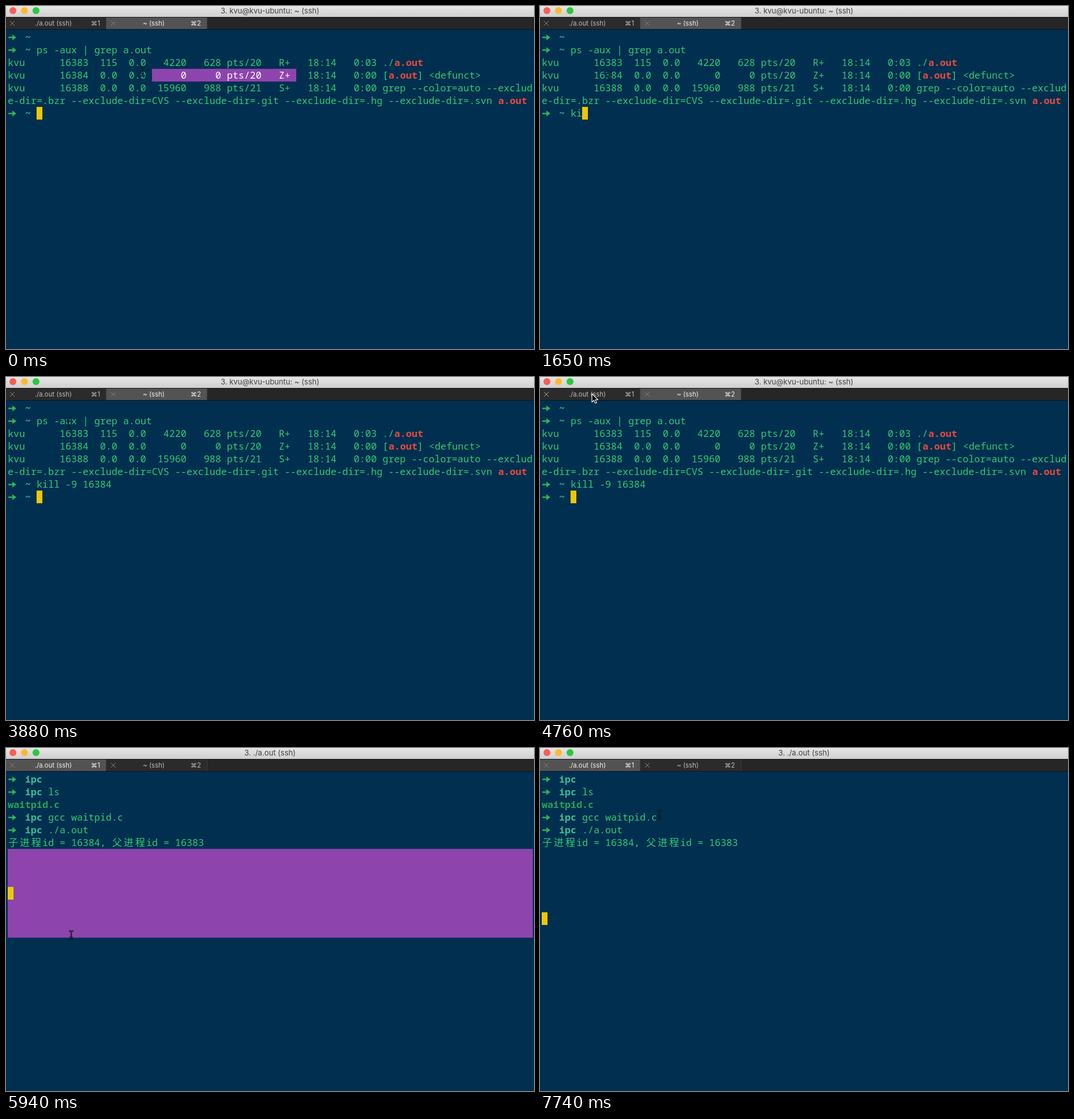
An HTML page that plays this animation: 915 px wide and 595 px high, repeating every 8 s.

```html
<!DOCTYPE html>
<html lang="en">
<head>
<meta charset="utf-8">
<title>Terminal session</title>
<style>
  html, body { margin: 0; width: 100%; height: 100%; overflow: hidden; background: #002f50; }
  svg { display: block; width: 915px; height: 595px; }
  text { white-space: pre; font: 16.667px "Noto Sans Mono", "DejaVu Sans Mono", monospace; fill: #2ecc71; }
  .bold { font-weight: 600; }
  .red { fill: #e74c3c; }
  .dir { fill: #36c096; }
  .file { fill: #27a354; }
  .cjk { font: 17px "Noto Sans CJK SC", "Noto Sans CJK", sans-serif; }
  .prompt { fill: #2faf5b; }
  .lit text { fill: #fff; }
  .lit .prompt { fill: #fff; }
  .ui { font: 11.3px Inter, "DejaVu Sans", sans-serif; fill: #bcbcbc; }
  #title { font-size: 13px; fill: #404040; text-anchor: middle; }
  .tab rect { fill: #2b2b2b; }
  .tab path { stroke: #848484; stroke-width: 1; fill: none; }
  .tab.on rect { fill: #535353; }
  .tab.on path { stroke: #7d7d7d; }
  .tab.on .ui { fill: #f2f2f2; }
  .tab.hover path { stroke: #a8a8a8; }
  .mid { text-anchor: middle; }
  .end { text-anchor: end; }
</style>
</head>
<body>
<svg id="stage" viewBox="0 0 915 595">
  <defs>
    <linearGradient id="bar" x1="0" y1="0" x2="0" y2="1">
      <stop offset="0" stop-color="#e6e6e6"/>
      <stop offset="1" stop-color="#cfcfcf"/>
    </linearGradient>
    <clipPath id="selClip"></clipPath>
  </defs>
  <rect width="915" height="595" fill="#002f50"/>
  <rect width="915" height="19" fill="url(#bar)"/>
  <rect y="19" width="915" height="22" fill="#141414"/>
  <rect y="20" width="915" height="20" fill="#262626"/>
  <circle cx="12" cy="8" r="6" fill="#fc5b53"/>
  <circle cx="32" cy="8" r="6" fill="#fdb92f"/>
  <circle cx="52" cy="8" r="6" fill="#29c940"/>
  <text id="title" class="ui" x="457.5" y="13"></text>
  <g id="tabs"></g>
  <g id="screens"></g>
  <g id="sel" fill="#8e44ad"></g>
  <g id="lit" class="lit" clip-path="url(#selClip)"></g>
  <rect id="caret" width="10" height="22" fill="#f0c800"/>
  <g id="mouse">
    <g id="beam" fill="none" stroke-linecap="round">
      <path id="beamPath" stroke="#10202c" stroke-width="2.4" stroke-opacity=".6"
        d="M-3-7.5Q0-7.5 0-5V5Q0 7.5-3 7.5M3-7.5Q0-7.5 0-5M0 5Q0 7.5 3 7.5M-1.5 3H1.5"/>
      <use href="#beamPath" style="stroke:#fff"/>
    </g>
    <path id="arrow" fill="#000" stroke="#fff" stroke-width="1.1" stroke-linejoin="round"
      d="M0 0V14.5L3.4 11.4L5.7 16.6L8.2 15.5L5.9 10.5H10.4Z"/>
    <g id="hand" stroke="#111" stroke-linejoin="round">
      <path fill="#fff" d="M-1-7C-2.4-9-5-8-4-5.5L-1.6 0.5C-4-1.5-6.5-1-5.8 0.6L-2 5.2V7.5H5.5V5L7 2V-2C6.8-3.6 4.8-3.6 4.6-2.2C4.2-4 2.3-4 2.1-2.6C1.7-4 .3-4 .2-3Z"/>
      <path d="M.5 2.2V5M2.4 2.2V5M4.3 2.2V5" stroke-width=".9"/>
    </g>
  </g>
</svg>
<script>
const LOOP = 8000, COLS = 91, CW = 10, CH = 22, LEFT = 3, TOP = 43;
const $ = id => document.getElementById(id);
const at = (row, col) => row * COLS + col;

function add(parent, tag, attrs = {}, text = "") {
  const node = document.createElementNS("http://www.w3.org/2000/svg", tag);
  for (const key in attrs) node.setAttribute(key, attrs[key]);
  node.textContent = text;
  parent.append(node);
  return node;
}

function put(parent, row, col, text, cls = "") {
  return add(parent, "text", { x: LEFT + col * CW, y: TOP + row * CH + 17, class: cls }, text);
}

function prompt(parent, row, dir, command = "") {
  const y = TOP + row * CH + 11.5;
  add(parent, "path", { class: "prompt", d: `M4 ${y - 1.3}H11V${y - 5}L18 ${y}L11 ${y + 5}V${y + 1.3}H4Z` });
  put(parent, row, 3, dir, "bold dir");
  return put(parent, row, 4 + dir.length, command);
}

function wide(parent, row, col, chars) {
  [...chars].forEach((c, i) => put(parent, row, col + 2 * i + 0.1, c, "cjk"));
}

function makeTab(x, width, label, key) {
  const tab = add($("tabs"), "g", { class: "tab" });
  add(tab, "rect", { x, y: 20, width, height: 20 });
  add(tab, "path", { d: `M${x ? 182 : 7} 26l8 8m0-8l-8 8` });
  add(tab, "text", { class: "ui mid", x: x ? 256 : 82, y: 34 }, label);
  add(tab, "text", { class: "ui end", x: x ? 338 : 163, y: 34 }, key);
  add($("tabs"), "rect", { x: x + width, y: 20, width: 1, height: 20, fill: "#3c3c3c" });
  return tab;
}

const tabs = [makeTab(0, 173, "./a.out (ssh)", "⌘1"), makeTab(174, 174, "~ (ssh)", "⌘2")];
const titles = ["3. ./a.out (ssh)", "3. kvu@kvu-ubuntu: ~ (ssh)"];
const screens = [0, 1].map(() => add($("screens"), "g"));

// Tab 1: the running program
const run = screens[0];
prompt(run, 0, "ipc");
prompt(run, 1, "ipc", "ls");
put(run, 2, 0, "waitpid.c", "bold file");
prompt(run, 3, "ipc", "gcc waitpid.c");
prompt(run, 4, "ipc", "./a.out");
wide(run, 5, 0, "子进程");
put(run, 5, 6, "id = 16384,");
wide(run, 5, 18, "父进程");
put(run, 5, 24, "id = 16383");

// Tab 2: the process list
const list = add(screens[1], "g");
prompt(list, 0, "~");
prompt(list, 1, "~", "ps -aux | grep a.out");
put(list, 2, 0, "kvu      16383  115  0.0   4220   628 pts/20   R+   18:14   0:03 ./");
put(list, 2, 67, "a.out", "bold red");
put(list, 3, 0, "kvu      16384  0.0  0.0      0     0 pts/20   Z+   18:14   0:00 [");
put(list, 3, 66, "a.out", "bold red");
put(list, 3, 71, "] <defunct>");
put(list, 4, 0, "kvu      16388  0.0  0.0  15960   988 pts/21   S+   18:14   0:00 grep --color=auto --exclud");
put(list, 5, 0, "e-dir=.bzr --exclude-dir=CVS --exclude-dir=.git --exclude-dir=.hg --exclude-dir=.svn");
put(list, 5, 85, "a.out", "bold red");
$("lit").append(list.cloneNode(true));
const typed = prompt(screens[1], 6, "~");
const nextPrompt = add(screens[1], "g");
prompt(nextPrompt, 7, "~");

const command = "kill -9 16384";
const dragEnd = at(3, 50);
const type = n => ({ chars: n, caret: [6, 5 + n] });
const beam = (x, y) => ({ mouse: ["beam", x, y] });
const arrow = (x, y) => ({ mouse: ["arrow", x, y] });
const hand = { mouse: ["hand", 123, 130] };

// Each step keeps whatever it does not change
const steps = [
  [0, { tab: 1, sel: [at(3, 25), dragEnd], entered: false, hover: false, ...type(0), ...beam(237, 114) }],
  [150, { sel: [at(2, 21), dragEnd], ...beam(212, 107) }],
  [300, { sel: [at(2, 15), dragEnd], ...beam(153, 105) }],
  [600, beam(135, 114)],
  [750, beam(120, 122)],
  [900, { sel: [at(3, 9), at(3, 14)] }],
  [1500, { sel: null, ...type(1) }],
  [1650, type(2)],
  [1950, type(3)],
  [2090, type(4)],
  [2240, type(5)],
  [2540, type(6)],
  [2830, { ...type(8), ...hand }],
  [2980, type(13)],
  [3130, beam(120, 122)],
  [3280, { entered: true, caret: [7, 5] }],
  [3880, beam(108, 84)],
  [4020, { hover: true, ...arrow(90, 29) }],
  [4320, arrow(88, 20)],
  [4470, arrow(87, 8)],
  [4620, arrow(88, 18)],
  [4760, arrow(90, 29)],
  [5060, { tab: 0, hover: false, caret: [9, 0] }],
  [5210, beam(91, 62)],
  [5350, beam(98, 150)],
  [5500, beam(108, 262)],
  [5650, beam(112, 315)],
  [5800, beam(113, 325)],
  [5940, { sel: [at(6, 0), at(13, 0)] }],
  [6240, { sel: null }],
  [6540, beam(180, 262)],
  [6690, beam(275, 130)],
  [6840, beam(294, 41)],
  [6990, beam(268, 58)],
  [7140, beam(225, 100)],
  [7290, beam(207, 116)],
  [7590, { caret: [10, 0] }],
  [7740, { caret: [11, 0] }]
];

function select(range) {
  const groups = [$("sel"), $("selClip")];
  groups.forEach(g => g.replaceChildren());
  if (!range) return;
  const [from, to] = range;
  for (let row = Math.floor(from / COLS); at(row, 0) < to; row++) {
    const start = Math.max(from - at(row, 0), 0);
    const end = Math.min(to - at(row, 0), COLS);
    const box = { x: LEFT + start * CW, y: TOP + row * CH, width: (end - start) * CW, height: CH };
    groups.forEach(g => add(g, "rect", box));
  }
}

const show = (node, on) => { node.style.display = on ? "" : "none"; };

function draw(s) {
  $("title").textContent = titles[s.tab];
  tabs.forEach((tab, i) => tab.classList.toggle("on", i === s.tab));
  tabs[0].classList.toggle("hover", s.hover);
  screens.forEach((screen, i) => show(screen, i === s.tab));
  show($("lit"), s.tab === 1);
  typed.textContent = command.slice(0, s.chars);
  show(nextPrompt, s.entered);
  select(s.sel);
  const [row, col] = s.caret;
  $("caret").setAttribute("x", LEFT + col * CW);
  $("caret").setAttribute("y", TOP + row * CH);
  const [kind, x, y] = s.mouse;
  ["beam", "arrow", "hand"].forEach(id => show($(id), id === kind));
  $("mouse").setAttribute("transform", `translate(${x} ${y})`);
}

let shown = 0;
function tick() {
  const time = performance.now() % LOOP;
  const past = steps.filter(([start]) => start <= time);
  if (past.length !== shown) {
    shown = past.length;
    draw(Object.assign({}, ...past.map(([, change]) => change)));
  }
  requestAnimationFrame(tick);
}
tick();
</script>
</body>
</html>
```
